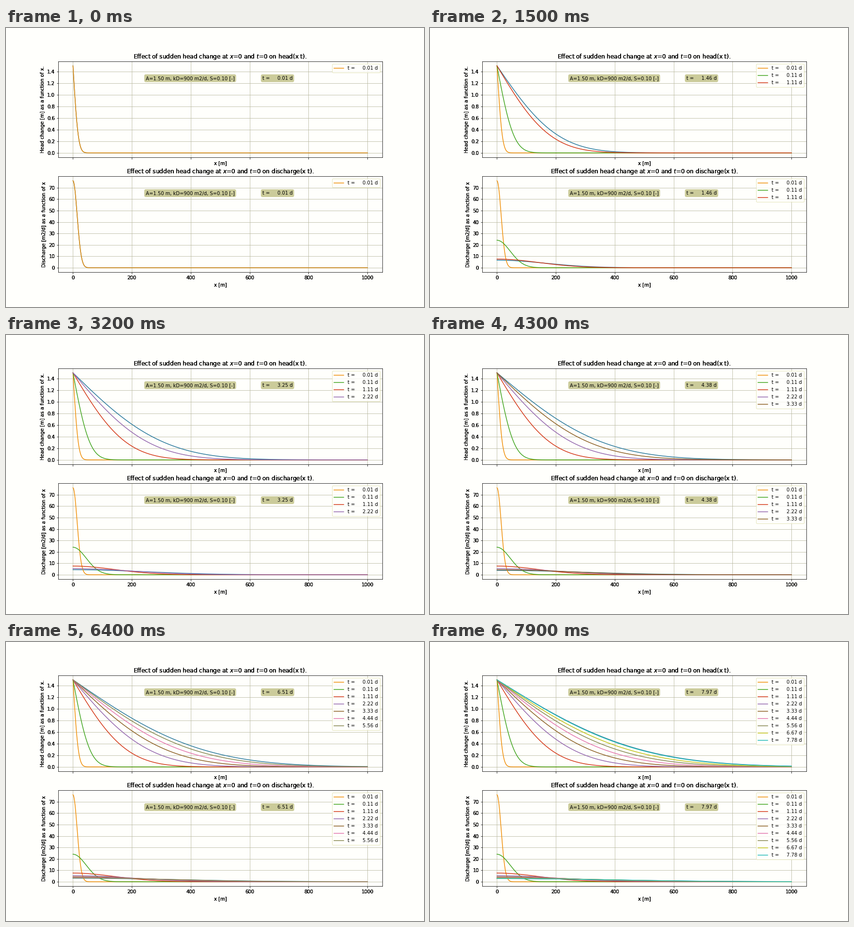
Animation of 864 by 576 pixels, one loop 8000 ms. Source, as a matplotlib script:

```python
import math

import numpy as np
import matplotlib.pyplot as plt
from matplotlib.animation import FuncAnimation

A, KD, S = 1.5, 900, 0.1
PAPER, GRID, BOX, FRAME = "#fffffc", "#b6b69c", "#cbcb9a", "#dedeac"
LIVE = "#2a799c"
COLORS = ["#f0900a", "#42a520", "#d43818", "#9467ae", "#8c6024",
          "#e377ae", "#868650", "#c2c218", "#22bab8"]

# Curves kept on screen, and the regular time steps between them
kept = np.array([1 / 90, 1 / 9] + [10 * i / 9 for i in range(1, 8)])
times = np.sort(np.concatenate([kept, 0.11223 * np.arange(1, 72)]))
x = np.linspace(0, 1000, 501)
erfc = np.vectorize(math.erfc)


def head(t):
    return A * erfc(x * math.sqrt(S / (4 * KD * t)))


def discharge(t):
    return A * math.sqrt(KD * S / (math.pi * t)) * np.exp(-x**2 * S / (4 * KD * t))


def stamp(t):
    return f"t = {t:8.2f} d"


def darken(text):
    """Draw a text several times over, so its soft edges turn black."""
    draw = text.draw

    def repeat(renderer):
        for _ in range(3):
            draw(renderer)

    text.draw = repeat


class Panel:
    def __init__(self, ax, func, name, ylabel, yticks, fmt):
        self.ax, self.func = ax, func
        top = func(kept[0])[0]
        ax.set_facecolor(PAPER)
        ax.set_xlim(-50, 1050)
        ax.set_ylim(-0.05 * top, 1.05 * top)
        ax.set_xticks(range(0, 1001, 200))
        ax.set_yticks(yticks, [fmt.format(v) for v in yticks])
        ax.grid(color=GRID, lw=0.8)
        ax.set_title(f"Effect of sudden head change at $x$=0 and $t$=0 on {name}(x t).")
        ax.set_xlabel("x [m]")
        ax.set_ylabel(ylabel)
        for text in [ax.title, ax.xaxis.label, ax.yaxis.label,
                     *ax.get_xticklabels(), *ax.get_yticklabels()]:
            darken(text)

        self.live, = ax.plot(x, func(kept[0]), color=LIVE)
        self.lines = [ax.plot(x, func(t), color=c, label=stamp(t))[0]
                      for t, c in zip(kept, COLORS)]
        self.note(0.27, f"A={A:.2f} m, kD={KD} m2/d, S={S:.2f} [-]")
        self.clock = self.note(0.63, "")

    def note(self, left, text):
        return self.ax.text(left, 0.825, text, va="center", transform=self.ax.transAxes,
                            bbox=dict(boxstyle="round", fc=BOX, ec="none"))

    def show(self, t):
        count = int(np.sum(kept <= t))
        self.live.set_ydata(self.func(t))
        self.clock.set_text(stamp(t))
        for i, line in enumerate(self.lines):
            line.set_visible(i < count)
        self.ax.legend(handles=self.lines[:count], loc="upper right",
                       facecolor=PAPER, edgecolor=FRAME)


plt.rcParams.update({"font.family": "DejaVu Sans", "font.size": 10,
                     "lines.linewidth": 1.5, "figure.subplot.bottom": 0.125})
fig, (upper, lower) = plt.subplots(2, 1, sharex=True, figsize=(12, 8), dpi=72,
                                   facecolor=PAPER)
panels = [
    Panel(upper, head, "head", "Head change [m] as a function of x.",
          np.arange(8) * 0.2, "{:.1f}"),
    Panel(lower, discharge, "discharge", "Discharge [m2/d] as a function of x",
          np.arange(8) * 10, "{:d}"),
]


def update(i):
    for panel in panels:
        panel.show(times[i])


anim = FuncAnimation(fig, update, frames=len(times), interval=100,
                     repeat=True, repeat_delay=0, blit=False)
plt.show()
```
